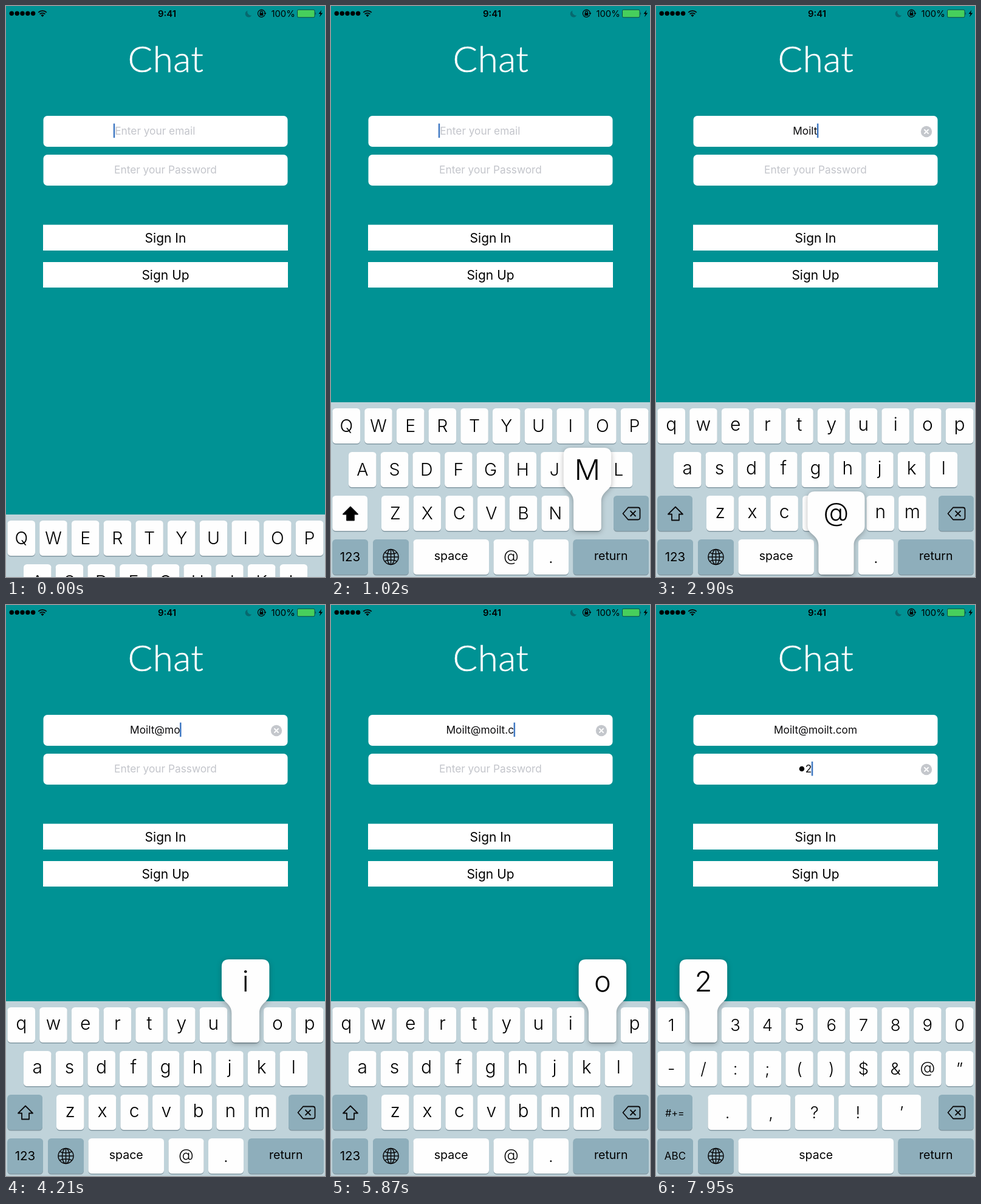
Write an HTML page that moves like this. It is 525x941 px and loops after 8 s.

```html
<!DOCTYPE html>
<html lang="en">
<head>
<meta charset="utf-8">
<title>Chat sign in</title>
<style>
html, body { margin: 0; width: 100%; height: 100%; overflow: hidden; background: #009294; }
svg { display: block; width: 100%; height: 100%; }
text { font-family: Inter, "Open Sans", sans-serif; }
.mid { text-anchor: middle; }
.field { font-size: 17.3px; }
.button { font-size: 21px; }
.title { font: 300 60px Lato, sans-serif; letter-spacing: .5px; fill: #fff; stroke: #fff; stroke-width: .6; }
.line { fill: none; stroke: #0a0a0c; stroke-width: 1.8; stroke-linejoin: round; }
#popup { filter: drop-shadow(0 2px 4px rgba(0, 0, 0, .28)); }
</style>
</head>
<body>
<svg viewBox="0 0 525 941" preserveAspectRatio="none">
  <rect width="525" height="941" fill="#009294"/>
  <g id="status">
    <g id="signal"></g>
    <path class="line" stroke-width="2" d="M53.2 10.6a9.6 9.6 0 0 1 13.6 0M55.6 13.4a6.2 6.2 0 0 1 8.8 0"/>
    <path d="M60 18l-2.5-2.8a3.6 3.6 0 0 1 5 0z"/>
    <text class="mid" x="265" y="17.8" font-size="15" font-weight="600">9:41</text>
    <path fill="#07696f" d="M397.5 7.5a5.6 5.6 0 1 0 6.7 7.9a6 6 0 0 1-6.7-7.9z"/>
    <path class="line" style="stroke-width:1.3" d="M426 14.5a6 6 0 1 1 .4-2.5M418.5 12v-1.6a1.9 1.9 0 0 1 3.8 0v1.6"/>
    <path d="M417.5 11.5h5.8v4.3h-5.8zM424.2 11.5h4.4l-2.2 2.8z"/>
    <text x="436.5" y="17.8" font-size="14.8">100%</text>
    <rect x="479.5" y="6.2" width="28.5" height="12.6" rx="2" fill="#47cf5c" stroke="#0c4a48"/>
    <path fill="#0c4a48" d="M509 10.3q2.2 2.2 0 4.4z"/>
    <path d="M519.4 6.5l-4.9 6.4h3.1l-1.7 5.4 5.3-6.8h-3.3z"/>
  </g>
  <text class="mid title" x="263" y="109">Chat</text>
  <g fill="#fff">
    <rect x="61.5" y="181" width="402" height="51" rx="6.5"/>
    <rect x="61.5" y="245" width="402" height="51" rx="6.5"/>
    <rect x="61" y="360.5" width="403" height="42.5"/>
    <rect x="61" y="422" width="403" height="42"/>
  </g>
  <text id="email" class="field" y="212"></text>
  <text id="pass" class="field" y="276.3"></text>
  <circle id="dot" r="4.3" cy="270"/>
  <rect id="caret" width="2.5" height="23.5" fill="#3f78c2"/>
  <g id="clear">
    <circle cx="445" r="9.2" fill="#c4c7cc"/>
    <path d="M441.4-3.6l7.2 7.2m0-7.2l-7.2 7.2" stroke="#fff" stroke-width="2"/>
  </g>
  <text class="mid button" x="262.5" y="389.5">Sign In</text>
  <text class="mid button" x="262.5" y="451">Sign Up</text>
  <g id="board">
    <rect width="525" height="300" fill="#c0d3da"/>
    <g id="keys"></g>
    <g id="popup"></g>
  </g>
</svg>
<script>
const $ = id => document.getElementById(id);
const LOOP = 8000, FOCUS = 6700, NUMBERS = 7160, INSERT = 75, HOLD = 155;
const EMAIL = 'Moilt@moilt.com';
const typed = EMAIL + '12';
const times = [1020, 1400, 1880, 2340, 2570, 2900, 3260, 3720, 4210, 4530,
  4840, 5160, 5390, 5870, 6230, 7460, 7870];

$('signal').innerHTML = [9.3, 18.2, 27, 35.8, 44.6]
  .map(x => `<circle cx="${x}" cy="12.2" r="3.7"/>`).join('');

const rowY = r => 10 + 72 * r;
const esc = c => c === '&' ? '&amp;' : c;

function label(s, x, y, size, weight = 400) {
  return `<text class="mid" x="${x}" y="${y}" font-size="${size}" font-weight="${weight}">${esc(s)}</text>`;
}

function cap(x, r, w, dark) {
  const y = rowY(r), rect = (dy, fill) =>
    `<rect x="${x}" y="${y + dy}" width="${w}" height="58" rx="5.5" fill="${fill}"/>`;
  return rect(1.5, '#8499a3') + rect(0, dark ? '#8eaebb' : '#fefefe');
}

// Character keys of one layout: c, x, row, width
function layout(mode) {
  const list = [];
  const row = (chars, r, x, w = 45.5, step = 52.7) =>
    [...chars].forEach((c, i) => list.push({ c, x: x + i * step, r, w }));
  if (mode === 'numbers') {
    row('1234567890', 0, 2.5);
    row('-/:;()$&@”', 1, 2.5);
    row('.,?!’', 2, 85.5, 64.3, 71.6);
  } else {
    const fit = s => mode === 'upper' ? s.toUpperCase() : s;
    row(fit('qwertyuiop'), 0, 2.5);
    row(fit('asdfghjkl'), 1, 29);
    row(fit('zxcvbnm'), 2, 83);
    if (mode !== 'plain') row('@.', 3, 267.5, 58, 65.5);
  }
  return list;
}

function drawKey({ c, x, r, w }) {
  const lower = /[a-z]/.test(c), at = c === '@';
  const size = lower ? 30 : at ? 25.5 : /[A-Z]/.test(c) ? 28.5 : 27.5;
  const dy = lower ? 36.5 : at ? 36 : 39.3;
  return cap(x, r, w) + label(c, x + w / 2, rowY(r) + dy, size, 350);
}

function drawKeys(mode) {
  const numbers = mode === 'numbers', upper = mode === 'upper';
  const wide = numbers || mode === 'plain';
  const spaceW = wide ? 255.5 : 124.5;
  const shift = numbers ? label('#+=', 31, 190, 16)
    : `<path class="line" ${upper ? 'style="fill:#000"' : ''} d="M32 172.5L44 184.5H38V194.5H26V184.5H20Z"/>`;
  return layout(mode).map(drawKey).join('') +
    cap(2.3, 2, 57.7, !upper) + shift +
    cap(465, 2, 58, true) +
    '<path class="line" d="M489 173.5H505q3.5 0 3.5 3.5v13q0 3.5-3.5 3.5H489L480.5 183.5ZM492.5 179l9 9m0-9l-9 9"/>' +
    cap(2.3, 3, 58.7, true) +
    (numbers ? label('ABC', 31.5, 261.3, 17) : label('123', 31.5, 262.3, 20.5)) +
    cap(69, 3, 59, true) +
    `<g class="line" style="stroke-width:1.5"><circle cx="98.5" cy="255" r="12.5"/><ellipse cx="98.5" cy="255" rx="6" ry="12.5"/>
     <path d="M98.5 242.5v25M86 255h25M88.5 248q10 4 20 0M88.5 262q10-4 20 0"/></g>` +
    cap(135.5, 3, spaceW) + label('space', 135.5 + spaceW / 2, 259.5, 19.5) +
    cap(398.5, 3, 124.5, true) + label('return', 460.8, 259.5, 19.5);
}

function drawPopup(c, mode) {
  const key = layout(mode).find(k => k.c === c);
  if (!key) return '';
  const { x, w } = key, y = rowY(key.r), grow = w > 50 ? 18 : 16.5;
  const l = Math.max(2, x - grow), end = x + w;
  const r = Math.min(523, end + grow), top = y - 79;
  const at = c === '@';
  return `<path fill="#fefefe" d="M${l + 12} ${top}H${r - 12}Q${r} ${top} ${r} ${top + 12}V${y - 22}
    C${r} ${y - 8} ${end} ${y - 8} ${end} ${y + 10}V${y + 52}q0 6-6 6H${x + 6}q-6 0-6-6V${y + 10}
    C${x} ${y - 8} ${l} ${y - 8} ${l} ${y - 22}V${top + 12}Q${l} ${top} ${l + 12} ${top}Z"/>` +
    label(c, (l + r) / 2, y - (at ? 30 : 26), at ? 43 : 47, 300);
}

const cache = {};
function fill(id, key, draw) {
  if (cache[id] === key) return;
  cache[id] = key;
  $(id).innerHTML = draw();
}

// Sets a field's text around a centre and returns its left and right ends
function place(id, text, hint, centre, dots = 0) {
  const el = $(id), s = text || hint;
  if (el.textContent !== s) el.textContent = s;
  el.setAttribute('fill', text ? '#0a0a0c' : '#c3c5cb');
  const lead = dots * 10.5, w = el.getComputedTextLength() + lead;
  const left = centre - w / 2;
  el.setAttribute('x', left + lead);
  return { left, right: left + w };
}

function boardTop(t) {
  const step = t < 90 ? 0 : 90 + Math.floor((t - 90) / 75) * 75;
  return step > 500 ? 653 : 653 + 185 * Math.exp(-step * 0.01216);
}

function render(t) {
  const count = times.filter(s => t >= s + INSERT).length;
  const onPass = t >= FOCUS;
  const mode = t >= NUMBERS ? 'numbers' : onPass ? 'plain' : count ? 'lower' : 'upper';
  const email = typed.slice(0, Math.min(count, EMAIL.length));
  const digits = typed.slice(EMAIL.length, Math.max(count, EMAIL.length));
  const dots = Math.max(0, digits.length - 1);

  const a = place('email', email, 'Enter your email', onPass ? 262.5 : 245.3);
  const b = place('pass', digits.slice(-1), 'Enter your Password', onPass ? 245.8 : 262.5, dots);
  $('dot').setAttribute('cx', b.left + 4.7);
  $('dot').setAttribute('opacity', dots);

  const ends = onPass ? b : a, current = onPass ? digits : email;
  $('caret').setAttribute('x', current ? ends.right - .5 : ends.left - 2.5);
  $('caret').setAttribute('y', onPass ? 258 : 193.7);
  const blink = t < times[0] ? Math.min(1, Math.max(0, (700 - t) / 140)) : 1;
  $('caret').setAttribute('opacity', blink);
  $('clear').setAttribute('transform', `translate(0 ${onPass ? 271 : 207})`);
  $('clear').setAttribute('opacity', current ? 1 : 0);

  $('board').setAttribute('transform', `translate(0 ${boardTop(t)})`);
  fill('keys', mode, () => drawKeys(mode));
  const i = times.findIndex(s => t >= s && t < s + HOLD);
  // A capital keeps its own layout while its popup lingers
  const popMode = i === 0 ? 'upper' : mode;
  fill('popup', i, () => i < 0 ? '' : drawPopup(typed[i], popMode));
}

const start = performance.now();
(function tick() {
  render((performance.now() - start) % LOOP);
  requestAnimationFrame(tick);
})();
</script>
</body>
</html>
```
